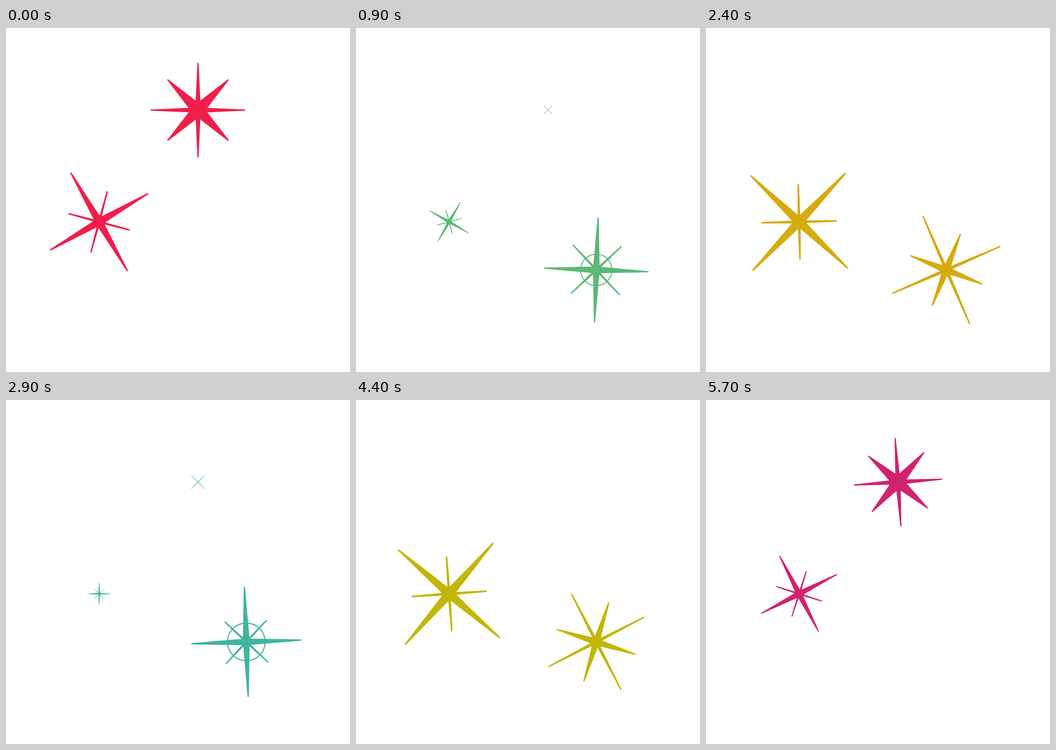
An HTML page with a canvas for the animation above (5.73 s loop, 748 by 748 pixels).

```html
<!DOCTYPE html>
<html lang="en">
<head>
<meta charset="utf-8">
<title>Twinkling stars</title>
<style>
  html, body { margin: 0; height: 100%; overflow: hidden; background: #fff; }
  canvas { display: block; width: 100vw; height: 100vh; }
</style>
</head>
<body>
<canvas width="748" height="748"></canvas>
<script>
const ctx = document.querySelector('canvas').getContext('2d');
const LOOP = 5730, CYCLE = 24;
const PALETTE = ['#f11e4c', '#fa941e', '#afc100', '#3fb59f', '#6059d0', '#712edc'];

const ramp = (u, from, to) => Math.min(1, Math.max(0, (u - from) / (to - from)));
const pulse = (u, birth, peak, death) => Math.min(ramp(u, birth, peak), ramp(u, death, peak));

// u counts steps from a star's birth and runs past CYCLE if it outlives the wrap.
const stars = [
  {
    x: 417.5, y: 178.5, birth: 9, core: 0.094,
    main: u => Math.max(101 * pulse(u, 12, 16, 24), 93 * pulse(u, 12, 24, 30)),
    minor: u => 102 * pulse(u, 9, 24, 30),
    turn: u => 3.75 * Math.max(0, u - 12)
  },
  {
    x: 202.5, y: 421.5, birth: 20, core: 0.053,
    main: u => Math.min(30.5 * (u - 20), 145, 24.2 * Math.max(0, 37 - u)),
    minor(u) { return 0.555 * this.main(u); },
    turn: u => -30 / 11 * ((u - 13) % 23)
  },
  {
    x: 522.5, y: 526, birth: 0, core: 0.049,
    main: u => 118.5 * ramp(u, 0, 4) * pulse(u, -8, 12, 18),
    minor: u => 148 * pulse(u, 0, 4, 18),
    turn: u => 45 - 90 / 23 * u,
    ring: u => 41 * pulse(u, 6, 12, 21)
  }
];

function colorAt(step) {
  const [a, b] = [0, 1].map(n => PALETTE[(Math.floor(step / 4) + n) % PALETTE.length]);
  const channel = (hex, i) => parseInt(hex.slice(i, i + 2), 16);
  const p = step % 4 / 4;
  return `rgb(${[1, 3, 5].map(i => Math.round(channel(a, i) * (1 - p) + channel(b, i) * p))})`;
}

function drawStar(star, step) {
  const u = star.birth + (step - star.birth + CYCLE) % CYCLE;
  const main = star.main(u), minor = star.minor(u), ring = star.ring ? star.ring(u) : 0;

  if (main + minor > 0) {
    // The longer the minor arms, the wider their share of the core.
    const notch = star.core * (main + minor);
    const split = 45 - 11 * Math.min(1.1, minor / main);
    ctx.beginPath();
    for (let arm = 0; arm < 360; arm += 90) {
      for (const [angle, r] of [[0, main], [split, notch], [45, minor], [90 - split, notch]]) {
        const a = (star.turn(u) + arm + angle) * Math.PI / 180;
        ctx.lineTo(star.x + r * Math.cos(a), star.y + r * Math.sin(a));
      }
    }
    ctx.closePath();
    ctx.lineWidth = 0.4 + Math.max(main, minor) * 0.021;
    ctx.fill();
    ctx.stroke();
  }

  if (ring > 0) {
    ctx.beginPath();
    ctx.arc(star.x, star.y, ring, 0, 2 * Math.PI);
    ctx.lineWidth = 0.4 + ring * 0.048;
    ctx.stroke();
  }
}

// 12.5 steps per second, shown on a 30 fps clock rounded to 10 ms.
function stepAt(ms) {
  const tick = Math.floor((Math.floor(ms / 10) * 10 + 5) * 0.03);
  return Math.floor(tick / 2.4 + 1e-6) % CYCLE;
}

function render() {
  const step = stepAt(performance.now() % LOOP);
  ctx.clearRect(0, 0, 748, 748);
  ctx.fillStyle = ctx.strokeStyle = colorAt(step);
  ctx.lineJoin = 'round';
  for (const star of stars) drawStar(star, step);
  requestAnimationFrame(render);
}
render();
</script>
</body>
</html>
```
